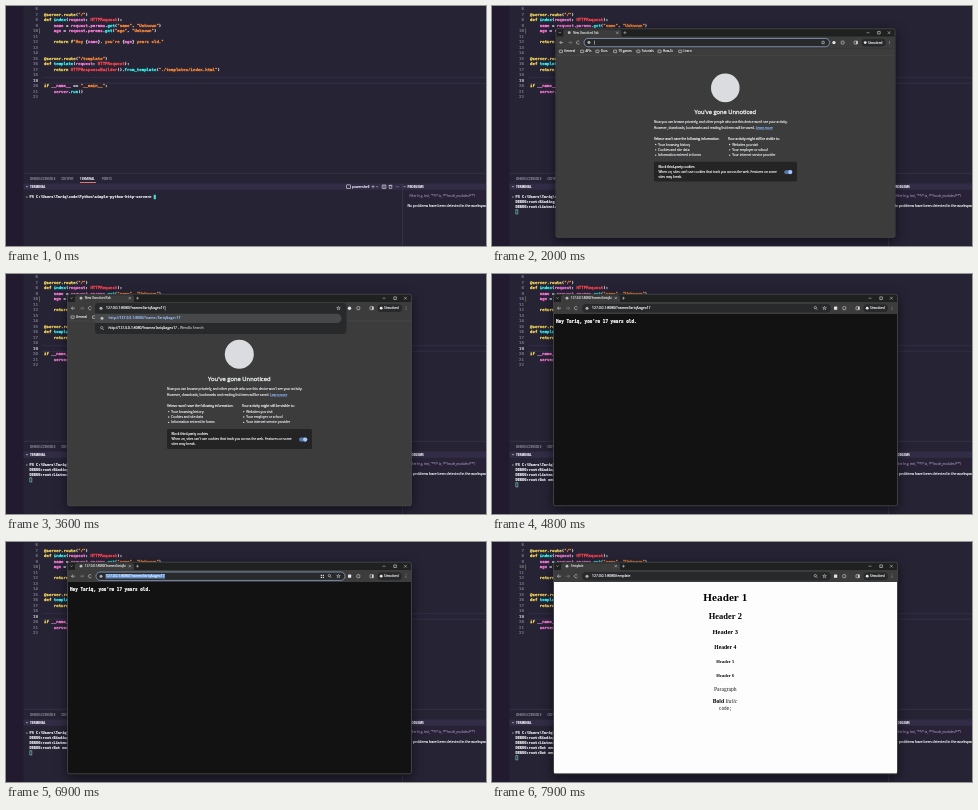
Animation, 480 px wide and 240 px high, one loop 8 s. Source, as an HTML page with a canvas:

```html
<!DOCTYPE html>
<html lang="en">
<head>
<meta charset="utf-8">
<title>HTTP server demo</title>
<style>
html, body { margin: 0; height: 100%; overflow: hidden; background: #262335; }
canvas { display: block; }
</style>
</head>
<body>
<canvas id="stage" width="480" height="240"></canvas>
<script>
const ctx = document.getElementById('stage').getContext('2d');
const LOOP = 8000, STEP = 100;
const MONO = '"DejaVu Sans Mono", monospace';
const SANS = '"Open Sans", sans-serif';
const SERIF = '"Liberation Serif", serif';
const CODE = 4.06, TERM = 3.62, PAGE = 4.32, UI = 3.4, NOTE = 3.18;
const HUES = { w: '#e4e0ea', y: '#fede5d', c: '#36f9f6', r: '#fe4450', o: '#ff8b39', p: '#ff7edb' };

const QUERY_URL = '127.0.0.1:8080/?name=Tariq&age=17';
const PAGE_URL = '127.0.0.1:8080/template';
const PROMPT = 'PS C:\\Users\\Tariq\\code\\Python\\simple-python-http-server> ';
const COMMAND = 'python .\\src\\main.py';

// Moments of the story, in ms
const AT = { type: 100, run: 800, open: 1900, url: 2600, load: 3800, select: 6500, retype: 7000, reload: 7700 };

// Each run of code starts with the letter of its colour
const SOURCE = {
  7: 'y@server.route|w(|o"/"|w)',
  8: 'ydef |cindex|w(|prequest|w: |rHTTPRequest|w):',
  9: 'p    name |w= |prequest|w.|pparams|w.|cget|w(|o"name"|w, |o"Unknown"|w)',
  10: 'p    age |w= |prequest|w.|pparams|w.|cget|w(|o"age"|w, |o"Unknown"|w)',
  12: 'y    return |yf|o"Hey |w{|pname|w}|o, you\'re |w{|page|w}|o years old."',
  15: 'y@server.route|w(|o"/template"|w)',
  16: 'ydef |ctemplate|w(|prequest|w: |rHTTPRequest|w):',
  17: 'y    return |rHTTPResponseBuilder|w().|cfrom_template|w(|o"./templates/index.html"|w)',
  20: 'yif |p__name__ |w== |o"__main__"|w:',
  21: 'p    server|w.|crun|w()'
};

// Text centred vertically on y; laid out large, then scaled for exact advances.
// A thin outline (heft, in em) keeps tiny letters legible.
function text(str, x, y, size, color, { font = SANS, style = '', align = 'left', heft = 0.05 } = {}) {
  ctx.save();
  ctx.translate(x, y + size * 0.34);
  ctx.scale(0.1, 0.1);
  ctx.font = `${style} ${size * 10}px ${font}`;
  ctx.textAlign = align;
  ctx.fillStyle = ctx.strokeStyle = color;
  ctx.lineJoin = 'round';
  ctx.fillText(str, 0, 0);
  if (heft) {
    ctx.lineWidth = size * 10 * heft;
    ctx.strokeText(str, 0, 0);
  }
  const width = ctx.measureText(str).width / 10;
  ctx.restore();
  return x + width;
}

function box(x, y, w, h, fill, r = 0, stroke) {
  ctx.beginPath();
  ctx.roundRect(x, y, w, h, r);
  if (fill) { ctx.fillStyle = fill; ctx.fill(); }
  if (stroke) { ctx.strokeStyle = stroke; ctx.lineWidth = 0.6; ctx.stroke(); }
}

function dot(x, y, r, color) {
  box(x - r, y - r, 2 * r, 2 * r, color, r);
}

function path(color, width, ...lines) {
  ctx.beginPath();
  for (const [x, y, ...rest] of lines) {
    ctx.moveTo(x, y);
    for (let i = 0; i < rest.length; i += 2) ctx.lineTo(rest[i], rest[i + 1]);
  }
  ctx.strokeStyle = color;
  ctx.lineWidth = width;
  ctx.stroke();
}

const typed = (str, t, from, to) =>
  str.slice(0, Math.max(0, Math.ceil(str.length * Math.min(1, (t - from) / (to - from)))));

function editor() {
  box(0, 0, 480, 240, '#262335');
  box(0, 0, 17.5, 240, '#221b30');
  path('#3b3452', 0.6, [36, 71.7, 480, 71.7], [36, 77.2, 480, 77.2]);
  box(33, 22.3, 0.6, 5.4, '#8b7c58');
  for (let n = 6; n <= 22; n++) {
    const y = 8.5 + (n - 7) * 5.5;
    text(n, 32, y, CODE, n === 19 ? '#c8c4d0' : '#77738a', { font: MONO, align: 'right' });
    let x = 38;
    for (const run of (SOURCE[n] || '').split('|'))
      x = text(run.slice(1), x, y, CODE, HUES[run[0]], { font: MONO, heft: 0.08 });
  }
}

function panel() {
  const dim = '#928ea0', lit = '#f0eef5';
  path('#3d384e', 0.7, [17.5, 167.3, 480, 167.3]);
  text('DEBUG CONSOLE', 24, 172.5, 3.1, dim);
  text('OUTPUT', 55.5, 172.5, 3.1, dim);
  text('TERMINAL', 74, 172.5, 3.1, lit);
  text('PORTS', 96, 172.5, 3.1, dim);
  box(74, 176, 16, 0.9, '#f97e72');
  box(17.5, 177.5, 462.5, 6.3, '#322c46');
  path(lit, 0.5, [20, 180, 21, 181.2, 22, 180], [397.5, 180, 398.5, 181.2, 399.5, 180]);
  text('TERMINAL', 24, 180.7, 3, lit, { style: 'bold' });
  text('PROBLEMS', 401.5, 180.7, 3, lit, { style: 'bold' });
  box(340.5, 178.8, 4, 3.7, null, 0.5, lit);
  text('powershell', 346, 180.7, 3.4, lit);
  path(lit, 0.5, [365.5, 180.7, 368.5, 180.7], [367, 179.2, 367, 182.2],
    [370, 180.2, 371, 181.2, 372, 180.2], [378, 179, 378, 182.4], [382.6, 179.4, 386.4, 179.4]);
  box(376.2, 179, 3.6, 3.4, null, 0, lit);
  box(383.2, 179.4, 2.6, 3, null, 0.3, lit);
  for (const x of [390, 391.4, 392.8]) dot(x, 180.8, 0.35, lit);
  path('#3d384e', 0.7, [396.5, 177.5, 396.5, 240]);
  box(400.5, 186.8, 90, 6.8, '#2a2139', 0.5);
  text('Filter (e.g. text, "**/*.ts, !**/node_modules/**")', 403.5, 190.2, 3, '#85809a');
  text('No problems have been detected in the workspace.', 401.5, 199.7, 3.42, lit);
}

function terminal(t) {
  const opts = { font: MONO, style: 'bold' };
  const rowY = n => 191 + n * 4.95;
  const running = t >= AT.run;
  dot(20.8, 191, 0.9, '#6e6a7c');
  let x = text(PROMPT, 23.5, rowY(0), TERM, '#f0eef4', opts);
  x = text(typed(COMMAND, t, AT.type, AT.run - 100), x, rowY(0), TERM, '#f3e78c', opts);
  if (!running) {
    box(x, rowY(0) - 2.2, 2.2, 4.4, '#4fd8d0');
    return;
  }
  const log = ['Binding TCP server at 127.0.0.1 port 8080', 'Listening for incomming requests'];
  if (t >= AT.load) log.push('Got new request');
  if (t >= AT.reload) log.push('Got new request');
  log.forEach((line, i) => text('DEBUG:root:' + line, 23.5, rowY(i + 1), TERM, '#f0eef4', opts));
  box(23.8, rowY(log.length + 1) - 2.1, 2, 4.2, null, 0, '#8fded9');
}

function privateTab() {
  const soft = '#dfe1e4', lit = '#f1f3f4';
  box(62, 40, 343, 191.5, '#3c3c3c');
  const folders = { General: 70, APIs: 91.5, Docs: 107, 'TV games': 125, Tutorials: 148.5, 'How-To': 170, Learn: 191 };
  for (const [name, x] of Object.entries(folders)) {
    box(x - 5, 41.9, 3.2, 2.5, null, 0.4, soft);
    text(name, x, 43.2, 3, soft);
  }
  path('#505050', 0.5, [62, 47, 405, 47]);
  dot(233.3, 80.2, 14.5, '#dadce0');
  text("You've gone Unnoticed", 233.3, 104.6, 5.85, lit, { align: 'center' });
  text("Now you can browse privately, and other people who use this device won't see your activity.", 161, 114.8, NOTE, soft);
  const x = text('However, downloads, bookmarks and reading list items will be saved. ', 161, 120.6, NOTE, soft);
  const end = text('Learn more', x, 120.6, NOTE, '#8ab4f8');
  path('#8ab4f8', 0.35, [x, 122.3, end, 122.3]);
  const lists = [
    [161, "Velmor won't save the following information:",
      'Your browsing history', 'Cookies and site data', 'Information entered in forms'],
    [236, 'Your activity might still be visible to:',
      'Websites you visit', 'Your employer or school', 'Your internet service provider']
  ];
  for (const [left, title, ...items] of lists) {
    text(title, left, 131.6, NOTE, lit);
    items.forEach((item, i) => {
      const y = 137.6 + i * 5.4;
      dot(left + 1.7, y, 0.7, soft);
      text(item, left + 4.3, y, NOTE, soft);
    });
  }
  box(161, 155, 145, 20, '#242424', 1.6);
  text('Block third-party cookies', 165.5, 160.4, NOTE, lit);
  text("When on, sites can't use cookies that track you across the web. Features on some", 165.5, 165.4, NOTE, soft);
  text('sites may break.', 165.5, 170.3, NOTE, soft);
  box(293, 163.6, 8.2, 4, '#5577ac', 2);
  dot(299.2, 165.6, 2.1, '#a8c7fa');
}

function greetingPage() {
  box(62, 40, 343, 191.5, '#121212');
  text("Hey Tariq, you're 17 years old.", 64, 48, PAGE, '#fff', { font: MONO, style: 'bold' });
}

function templatePage() {
  const serif = { font: SERIF, heft: 0 };
  const centred = { ...serif, align: 'center' };
  box(62, 40, 343, 191.5, '#fdfdfd');
  const sizes = [11.2, 8.5, 6.55, 5.6, 4.65, 4.65], ys = [55, 74, 90.2, 105, 119.2, 133];
  sizes.forEach((size, i) =>
    text('Header ' + (i + 1), 233.3, ys[i], size, '#000', { ...centred, style: 'bold' }));
  text('Paragraph', 233.3, 147, 5.6, '#222', centred);
  const x = text('Bold ', 220.8, 159.3, 5.6, '#000', { ...serif, style: 'bold' });
  text('Italic', x, 159.3, 5.6, '#222', { ...serif, style: 'italic' });
  text('code;', 233.3, 166.6, PAGE, '#222', { ...centred, font: MONO });
}

function toolbar(title, blank) {
  const ink = '#d5d7da';
  box(62, 20.5, 343, 12, '#1f2020', 2);
  box(62, 28, 343, 12, '#3c3c3c');
  box(69, 21.3, 59, 8, '#3c3c3c', [2, 2, 0, 0]);
  path(ink, 0.5, [64.2, 23.4, 65.4, 24.6, 66.6, 23.4]);
  dot(75, 24.2, 1.4, '#b9bcc0');
  ctx.save();
  ctx.beginPath();
  ctx.rect(78, 20, 41.5, 9);
  ctx.clip();
  text(title, 79, 24.2, 2.85, ink);
  ctx.restore();
  path(ink, 0.5, [122.7, 23.1, 124.9, 25.3], [124.9, 23.1, 122.7, 25.3],
    [130, 24.2, 133, 24.2], [131.5, 22.7, 131.5, 25.7],
    [376.5, 24.2, 379.5, 24.2], [398, 22.8, 400.8, 25.6], [400.8, 22.8, 398, 25.6]);
  box(387.8, 22.9, 2.6, 2.6, null, 0, ink);
  path(ink, 0.6, [69, 34.2, 65.5, 34.2], [67, 32.6, 65.4, 34.2, 67, 35.8]);
  path('#85878a', 0.6, [74, 34.2, 77.5, 34.2], [76, 32.6, 77.6, 34.2, 76, 35.8]);
  ctx.beginPath();
  ctx.arc(84, 34.2, 1.6, 0.5, 5.6);
  ctx.strokeStyle = ink;
  ctx.stroke();
  if (!blank) box(342, 32.6, 3.2, 3.2, '#e4e5e7', 0.6);
  else dot(343.5, 34.2, 1.7, '#e4e5e7');
  box(350.8, 32.7, 3, 3, null, 0.8, ink);
  box(364, 32.7, 3.4, 3, null, 0.3, ink);
  box(366, 32.7, 1.4, 3, ink);
  box(371.5, 30.3, 24.5, 7.8, '#28292a', 3.9);
  dot(375.2, 34.2, 1.4, '#e8eaed');
  text('Unnoticed', 378.2, 34.2, 3, '#f0f1f2');
  for (const y of [32.8, 34.2, 35.6]) dot(400, y, 0.4, ink);
}

function star(x, y) {
  ctx.beginPath();
  for (let i = 0; i < 10; i++) {
    const a = i * Math.PI / 5 - Math.PI / 2, r = i % 2 ? 0.8 : 1.9;
    ctx.lineTo(x + r * Math.cos(a), y + r * Math.sin(a));
  }
  ctx.closePath();
  ctx.strokeStyle = '#d5d7da';
  ctx.lineWidth = 0.5;
  ctx.stroke();
}

function addressBar(url, { focused, selected, open, loaded }) {
  const ink = '#e8eaed';
  if (open) {
    box(89, 29, 251.5, 31, '#28292a', 3.5);
    box(89, 39.8, 246.5, 9.2, '#46484a', [0, 4.6, 4.6, 0]);
    dot(96, 44.3, 1.5, '#b9bcc0');
    text('http://' + url, 102.5, 44.3, UI, '#9cc2ff', { style: 'bold', heft: 0 });
    const x = text('http://' + url, 102.5, 54.2, UI, ink);
    text(' - Wendlo Search', x, 54.2, UI, '#a9abae');
    box(94.5, 52.5, 2.4, 2.4, null, 1.2, '#c4c7c5');
    path('#c4c7c5', 0.6, [96.6, 54.6, 98, 56]);
  } else {
    box(90, 30, 249, 8.4, '#28292a', 4.2, focused && '#a8c7fa');
  }
  dot(95, 34.2, 1.5, '#aeb1b4');
  if (selected) box(99.5, 31.9, 59.5, 4.7, '#5f8fd0');
  const end = text(url, 100, 34.2, UI, ink);
  if (focused && !selected) box(end + 0.3, 32, 0.5, 4.4, ink);
  if (loaded) {
    box(322.2, 32.5, 2.3, 2.3, null, 1.15, '#d5d7da');
    path('#d5d7da', 0.6, [324.2, 34.6, 325.4, 35.8]);
    if (selected)
      for (const [dx, dy] of [[0, 0], [2, 0], [0, 2], [2, 2]]) box(314.7 + dx, 32.8 + dy, 1.3, 1.3, '#d5d7da');
  }
  star(332.5, 34.2);
}

function browser(t) {
  const p = Math.min(1, (t - AT.open + 100) / 300);
  const scale = 1 - 0.126 * (1 - p) ** 2;
  const blank = t < AT.load, done = t >= AT.reload;
  const retyping = t >= AT.retype && !done;
  let url = QUERY_URL;
  if (blank) url = typed(QUERY_URL, t, AT.url, AT.load - 300);
  if (retyping) url = typed(PAGE_URL, t, AT.retype - 100, AT.reload - 200);
  if (done) url = PAGE_URL;

  ctx.save();
  ctx.globalAlpha = t < AT.open + STEP ? 0.6 : 1;
  ctx.translate(233, 203);
  ctx.scale(scale, scale);
  ctx.translate(-233, -203);
  ctx.shadowColor = '#0009';
  ctx.shadowBlur = 12;
  ctx.shadowOffsetY = 3;
  box(61.5, 20, 344, 212, '#1f2020', 2);
  ctx.shadowColor = 'transparent';
  if (blank) privateTab();
  else if (done) templatePage();
  else greetingPage();
  toolbar(blank ? 'New Unnoticed Tab' : done ? 'Template' : QUERY_URL, blank);
  addressBar(url, {
    focused: blank || (t >= AT.select && !done),
    selected: t >= AT.select && t < AT.retype,
    open: (blank && url) || retyping,
    loaded: !blank
  });
  box(61.5, 20.2, 344, 211.6, null, 2, '#5a5a5a');
  ctx.restore();
}

function draw(now) {
  const t = Math.floor(now % LOOP / STEP) * STEP;
  editor();
  panel();
  terminal(t);
  if (t >= AT.open) browser(t);
}

const start = performance.now();
function tick() {
  draw(performance.now() - start);
  requestAnimationFrame(tick);
}
tick();
</script>
</body>
</html>
```
